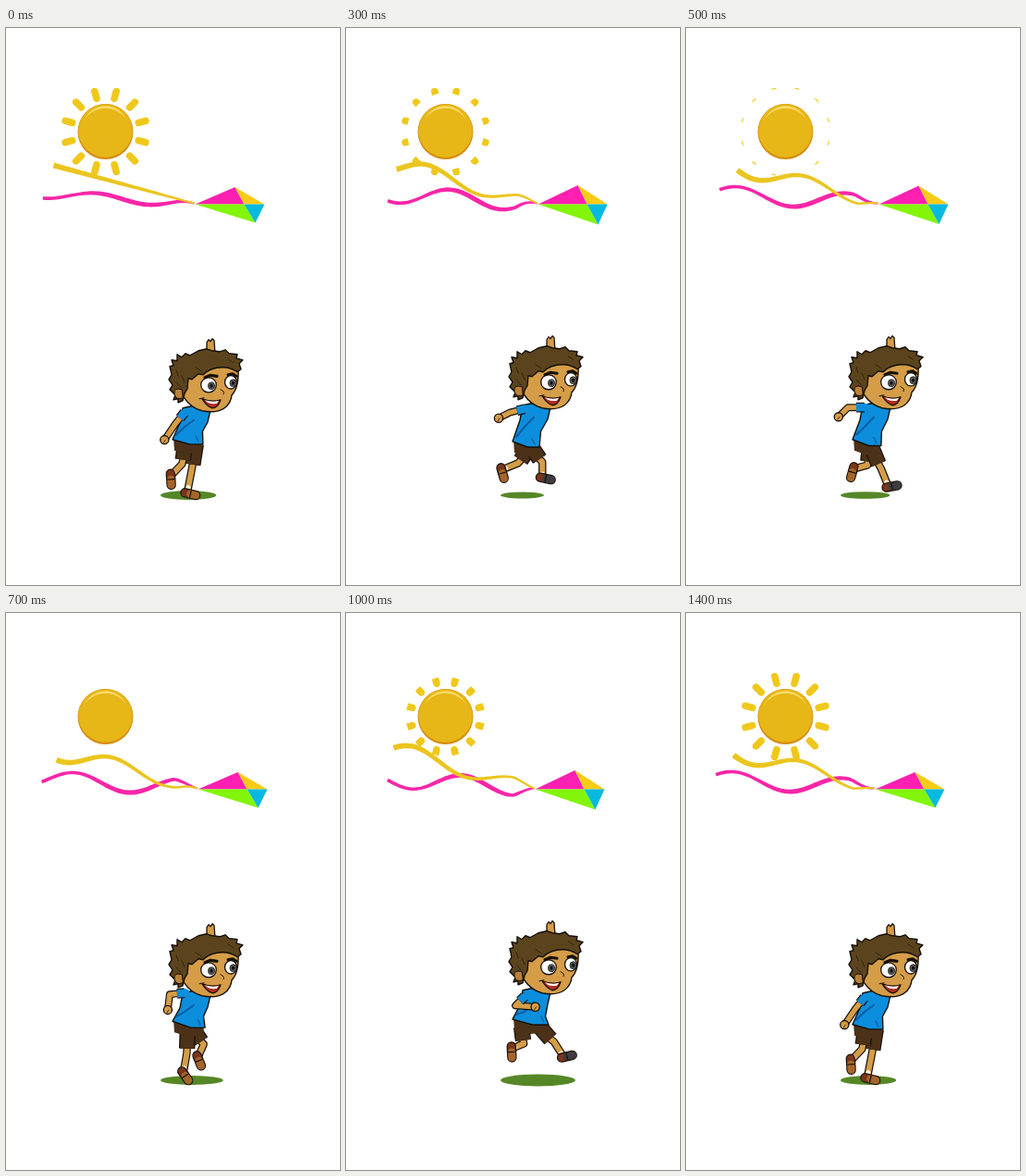
These frames come from a looping animation (361 px wide and 602 px high, 1.5 s). An HTML page with a canvas:

```html
<!DOCTYPE html>
<html lang="en">
<head>
<meta charset="utf-8">
<title>Boy flying a kite</title>
<style>
html, body { margin: 0; width: 100%; height: 100%; overflow: hidden; background: #fff; }
canvas { display: block; }
</style>
</head>
<body>
<canvas id="stage" width="361" height="602"></canvas>
<script>
const ctx = document.getElementById('stage').getContext('2d');
const SKIN = '#d59d48', HAIR = '#5b441d', SHORTS = '#4b3118', SHIRT = '#0c8edc', INK = '#161008';
const TAU = Math.PI * 2;
const STRIDE = 14; // steps of 100 ms in one running cycle

let step = 0;

// Periodic value of the running cycle: a mean plus one or two harmonics, each with the step of its peak.
const cycle = (mean, amp, peak, amp2 = 0, peak2 = 0) =>
  mean + amp * Math.cos(TAU * (step - peak) / STRIDE) + amp2 * Math.cos(2 * TAU * (step - peak2) / STRIDE);

const between = (x1, y1, x2, y2, k) => [x1 + (x2 - x1) * k, y1 + (y2 - y1) * k];

function trace(p) {
  ctx.beginPath();
  for (let i = 0; i < p.length; i += 2) ctx.lineTo(p[i], p[i + 1]);
}
function stroke(color, width, cap = 'round') {
  ctx.strokeStyle = color;
  ctx.lineWidth = width;
  ctx.lineCap = cap;
  ctx.lineJoin = 'round';
  ctx.stroke();
}
function polygon(p, fill, ink) {
  trace(p);
  ctx.closePath();
  ctx.fillStyle = fill;
  ctx.fill();
  if (ink) stroke(INK, ink);
}
function line(p, color, width, cap) { trace(p); stroke(color, width, cap); }
function limb(p, color, width, cap) {
  line(p, INK, width + 2.4, cap);
  line(p, color, width, cap);
}
function ellipse(x, y, rx, ry, fill, ink) {
  ctx.beginPath();
  ctx.ellipse(x, y, rx, ry, 0, 0, TAU);
  ctx.fillStyle = fill;
  ctx.fill();
  if (ink) stroke(INK, ink);
}
function shape(d, fill, ink) {
  const path = new Path2D(d);
  if (fill) { ctx.fillStyle = fill; ctx.fill(path); }
  if (ink) {
    ctx.strokeStyle = INK;
    ctx.lineWidth = ink;
    ctx.lineCap = ctx.lineJoin = 'round';
    ctx.stroke(path);
  }
}

function drawSun() {
  // Rays are eaten away from the inside, then grow out of the sun again.
  const half = STRIDE / 2;
  const inner = step < half ? 33 + Math.min(16, 2.9 * step) : 33;
  const outer = step < half ? 49 : 33 + Math.min(16, 3.3 * (step - half));
  ctx.save();
  ctx.translate(107.5, 112);
  if (outer > inner) {
    ctx.save();
    ctx.beginPath();
    ctx.arc(0, 0, outer, 0, TAU);
    ctx.arc(0, 0, inner, 0, TAU, true);
    ctx.clip();
    for (let i = 0; i < 12; i++) {
      const a = (i + 0.5) * TAU / 12, c = Math.cos(a), s = Math.sin(a);
      line([37 * c, 37 * s, 45 * c, 45 * s], '#f0c81c', 7.6);
    }
    ctx.restore();
  }
  ellipse(0, 0, 30, 30, '#d68c12');
  ellipse(0, -1, 29.2, 28.7, '#e7b617');
  ellipse(0, -2, 25, 25.8, '#fbdc68');
  ellipse(0, 1, 27, 26.2, '#e7b617');
  ctx.restore();
}

// A tapered ribbon streaming left from the kite; offset(v) is its height below the tip at v = 0..1.
function drawTail(reach, offset, width, color) {
  const upper = [], lower = [], count = 60;
  for (let i = 0; i <= count; i++) {
    const v = i / count, d = 0.01;
    const nx = offset(v + d) - offset(v - d), ny = 2 * d * reach;
    const r = width(v) / 2 / Math.hypot(nx, ny);
    const x = 204 - reach * v, y = 189.5 + offset(v);
    upper.push(x - nx * r, y - ny * r);
    lower.unshift(x + nx * r, y + ny * r);
  }
  polygon([...upper, ...lower], color);
}

function drawKite() {
  const sway = Math.cos(TAU * (step - 1.7) / 7.8);
  const unfurl = Math.min(1, step / 2);
  const wave = (v, turns, crest) => Math.min(1, 7 * Math.abs(v)) * Math.cos(TAU * turns * (v - crest));
  ctx.save();
  ctx.translate(cycle(1, 2.5, 5), 0);
  drawTail(165 - 7 * sway,
    v => -10 * v + (4.5 + 4.5 * unfurl) * wave(v, 1.45, 0.35 - 0.22 * sway),
    v => 2 + 3 * Math.sin(Math.PI * (1 - v * 0.2) * Math.min(1, 1.3 * v)) , '#f826a8');
  drawTail(152,
    v => -41 * v + 9 * unfurl * (0.6 + 0.6 * v) * wave(v, 1.35, 0.3 + 0.19 * sway),
    v => 2 + 4 * v, '#ebc51f');

  const flap = 2 * Math.abs(Math.sin(TAU * step / STRIDE));
  const tip = [205, 190.5], cross = [258, 190.5], right = [280, 190.5];
  const top = [248, 172 - flap], bottom = [270, 210.5 + flap];
  polygon([...tip, ...top, ...cross], '#ff1fb1');
  polygon([...top, ...right, ...cross], '#f7cb16');
  polygon([...tip, ...cross, ...bottom], '#82f50a');
  polygon([...cross, ...right, ...bottom], '#08b9df');
  ctx.restore();
}

function drawLeg(hipX, footX, footY, degrees, sole) {
  const hipY = cycle(454, 3, 4), a = degrees * Math.PI / 180;
  const dx = 6 * Math.cos(a), dy = 6 * Math.sin(a);
  const heel = [footX - dx, footY - dy], toe = [footX + dx, footY + dy];
  const ankle = between(...heel, ...toe, 0.2);

  // The knee bends forward by the slack of the leg.
  const ax = ankle[0] - hipX, ay = ankle[1] - hipY, reach = Math.hypot(ax, ay);
  const bend = Math.max(0, Math.min(9, 0.45 * (46 - reach))) / reach;
  const knee = [hipX + ax / 2 + ay * bend, hipY + ay / 2 - ax * bend];

  limb([hipX, hipY, ...knee, ...ankle], SKIN, 6);
  line([...between(...knee, ...ankle, 0.75), ...ankle], '#f4f0e8', 5);
  limb([...heel, ...toe], '#7a3518', 8);
  line([footX, footY, ...toe], sole ? '#3d3c41' : '#a4652a', 8);
  line([footX - dy * 0.6, footY + dx * 0.6, footX + dy * 0.6, footY - dx * 0.6], INK, 1.2);
  limb([hipX, hipY - 4, ...between(hipX, hipY, ...knee, 0.75)], SHORTS, 15, 'butt');
}

function drawHead() {
  shape('M195 374Q188 386 192 397Q200 409 212 412Q227 415 236 409Q243 404 244 395Q252 387 251 366L220 360Z', SKIN, 1.4);
  shape('M180 392L177 389L180 384L176 378L179 373L177 364L181 363L179 357L185 358L185 351L190 354L194 350L199 352L208 347L217 345L223 347L231 348L237 346L241 350L250 351L249 355L256 357L252 361L254 367L250 370Q243 365 234 365Q221 365 213 373L208 372L201 378L197 377L196 388L193 393L191 401L186 403L186 399L181 400L183 395Z', HAIR, 1.4);
  shape('M184 368L186 374M184 381L189 387M190 374L193 381M205 365L211 369M240 356L246 360', null, 0.6);
  shape('M190 389Q181 386 182 394Q184 401 191 398Z', '#b9823a', 1);
  ellipse(243, 381, 6.5, 7.2, '#fff', 1.3);
  ellipse(219, 384, 8.3, 8, '#fff', 1.3);
  for (const [x, y] of [[222, 385], [245.5, 382]]) {
    ellipse(x, y, 3.6, 4, '#56575a', 0.7);
    ellipse(x, y, 1.6, 2, '#111');
  }
  line([215, 376, 221, 373.5, 228, 374.5], INK, 3.2);
  line([240, 373, 245, 372, 249, 374.5], INK, 3);
  shape('M232 389Q237 391 235 394M209 399L214 398', null, 1);
  shape('M212 399Q223 403 232 400Q229 409 223 409Q217 407 212 399Z', '#b52b20', 1.3);
  shape('M215 400.5Q223 403 230 401L228 404Q222 405 218 403Z', '#fff');
}

function drawArm(x, y) {
  const elbow = [cycle(180, 5, 12), cycle(420, 10, 12.5)];
  const hand = [cycle(179, 20, 10.3, 6, 10.3), cycle(430, 9, 13, 7, 0)];
  limb([x, y, ...elbow, ...hand], SKIN, 5.5);
  ellipse(...hand, 4.6, 4.6, SKIN, 1.3);
  line([hand[0] - 1, hand[1] + 3, hand[0] + 1, hand[1]], INK, 0.8);
  limb([x, y, ...between(x, y, ...elbow, 0.5)], SHIRT, 8.5, 'butt');
  ellipse(x + 1, y, 4.3, 4.3, SHIRT);
}

function drawBoy() {
  const rx = cycle(32, 8.5, 10);
  ellipse(167 + rx, 505, rx, cycle(5, 1.5, 10.5), '#568727');

  drawLeg(cycle(204, 6, 11), cycle(204, 35, 10.2), cycle(487, 10, 13.7, 7, 13.7),
    cycle(38, 58, 4.6, 12, 12.5), step > 8 && step < 12);
  drawLeg(cycle(195, 6, 4), cycle(193.5, 22, 4.3, 10, 4.3), cycle(487, 10, 5, 7, 7),
    cycle(55, 45, 11.3, 25, 1), step > 2 && step < 6);

  const left = [180, cycle(443, 4, 2.5)], right = [cycle(214, 5, 10), cycle(449, 4, 3)];
  const bob = cycle(0, 0, 0, 2, 7.5);
  polygon([left[0] + 1, left[1] - 2, right[0] - 1, right[1] - 3, right[0] - 2, right[1] + 8,
    (left[0] + right[0]) / 2, right[1] + 10, left[0] + 2, left[1] + 12], SHORTS);

  ctx.save();
  ctx.translate(0, bob);
  shape('M217 350L217 338L219 335L221 337L223 334L225 336L226 350Z', SKIN, 1.3);
  ctx.restore();

  polygon([191, 409 + bob, 205, 406 + bob, 221, 411 + bob, 218, 424 + bob, (right[0] + 214) / 2 - 1, 436,
    ...right, (left[0] + right[0]) / 2 + 2, right[1], ...left, 188, 425 + bob], SHIRT, 1.4);
  line([left[0] + 4, left[1] - 5, 193, 431, 203, 422 + bob], '#0a5ca6', 2);
  line([right[0] - 5, right[1] - 3, right[0] - 8, right[1] - 9], '#0a5ca6', 1.2);
  drawArm(193, cycle(413, 3, 12.5));

  ctx.save();
  ctx.translate(0, bob);
  drawHead();
  ctx.restore();
}

function draw() {
  step = Math.floor(performance.now() % 1500 / 100);
  ctx.clearRect(0, 0, 361, 602);
  drawSun();
  drawKite();
  drawBoy();
  requestAnimationFrame(draw);
}
draw();
</script>
</body>
</html>
```
